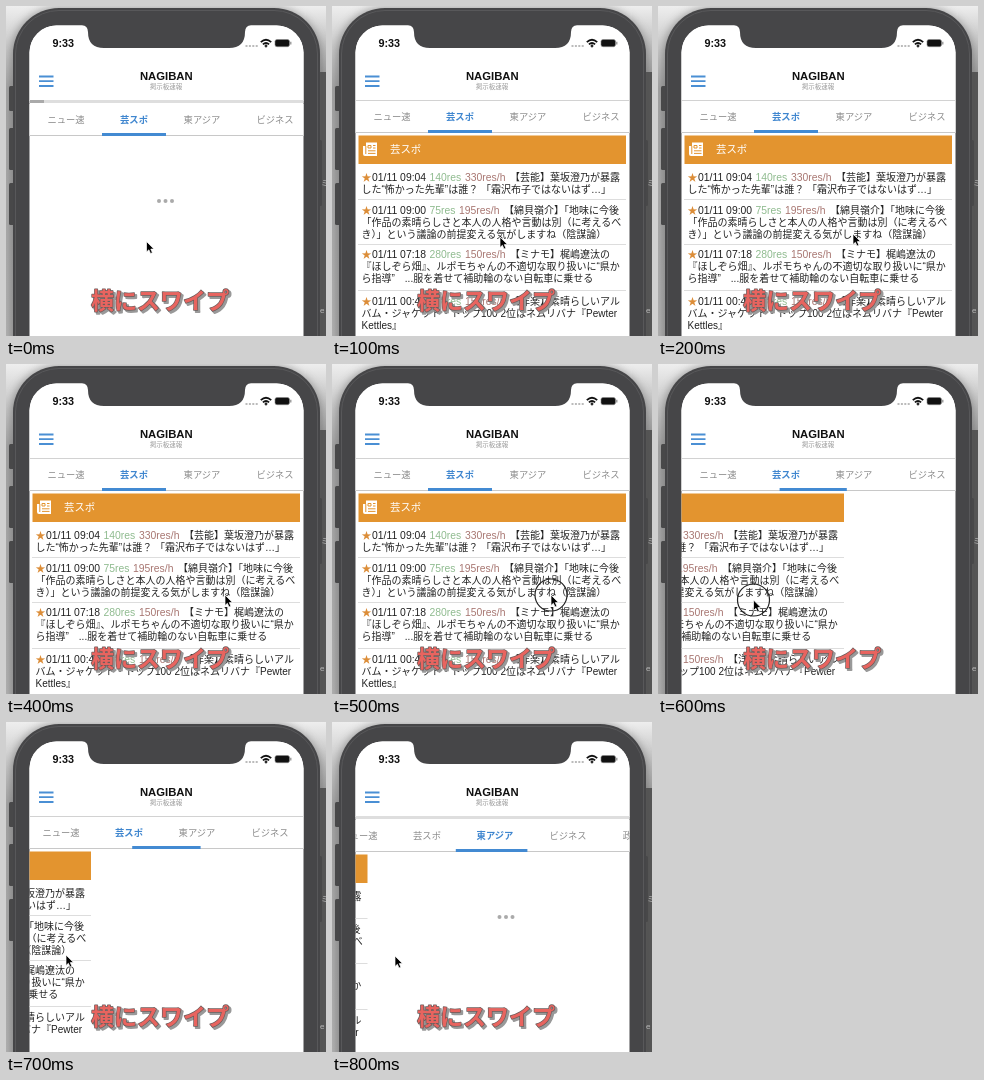
An HTML page that plays this animation: 320 by 330 pixels, repeating every 0.9 s.

```html
<!DOCTYPE html>
<html lang="ja">
<head>
<meta charset="utf-8">
<style>
html, body { margin: 0; width: 100%; height: 100%; overflow: hidden; background: #999; }
svg { display: block; width: 320px; height: 330px; }
text { font-family: "Liberation Sans", "Noto Sans CJK JP", "Noto Sans CJK", sans-serif; white-space: pre; }
.mid { text-anchor: middle; }
.tab { font-size: 9.3px; fill: #8c8c8c; }
.tab.on { fill: #3f86cf; font-weight: bold; }
.row { font-size: 10px; fill: #222; }
.row .latin { font-size: 10.4px; }
.caption { font-size: 23px; font-weight: bold; stroke-linejoin: round; paint-order: stroke; }
</style>
</head>
<body>
<svg viewBox="0 0 320 330">
  <defs>
    <linearGradient id="wall" x2="0" y2="1">
      <stop stop-color="#eee"/><stop offset=".25" stop-color="#a5a5a5"/><stop offset="1" stop-color="#b4b4b4"/>
    </linearGradient>
    <linearGradient id="side" x2="0" y2="1">
      <stop stop-color="#eee"/><stop offset=".2" stop-color="#a0a0a0"/><stop offset=".2" stop-color="#555"/>
    </linearGradient>
    <filter id="soft" x="-10%" y="-10%" width="120%" height="120%"><feGaussianBlur stdDeviation="4"/></filter>
    <clipPath id="screen"><rect x="23.5" y="19.5" width="274" height="340" rx="27"/></clipPath>
  </defs>

  <rect width="320" height="330" fill="url(#wall)"/>
  <rect x="300" width="20" height="330" fill="url(#side)"/>
  <rect x="5" y="1" width="310" height="400" rx="48" fill="#555" opacity=".5" filter="url(#soft)"/>
  <g fill="#484849">
    <rect x="3" y="80" width="6" height="25" rx="1.5"/>
    <rect x="3" y="122" width="6" height="42" rx="1.5"/>
    <rect x="3" y="177" width="6" height="42" rx="1.5"/>
    <rect x="311" y="134" width="5" height="66" rx="1.5"/>
  </g>
  <rect x="7" y="2" width="307" height="400" rx="46" fill="#464648"/>
  <rect x="9.5" y="4.5" width="302" height="400" rx="43.5" fill="none" stroke="#58585a"/>
  <g font-size="8" fill="#bbb"><text x="315" y="180">ミ</text><text x="314" y="307">e</text></g>

  <g clip-path="url(#screen)">
    <rect x="23" y="18" width="275" height="320" fill="#fff"/>
    <g id="list"></g>
    <g id="dots" fill="#aaa"><circle cx="-6.5" cy="195" r="2"/><circle cy="195" r="2"/><circle cx="6.5" cy="195" r="2"/></g>

    <rect x="23" y="18" width="275" height="77" fill="#fff"/>
    <path d="M23 94.5H298" stroke="#d2d2d2"/>
    <g id="loading"><rect x="23" y="94" width="275" height="3" fill="#dedede"/><rect id="progress" x="24" y="94" width="14" height="3" fill="#aaa"/></g>
    <g id="bar">
      <rect x="23" y="95" width="275" height="32" fill="#fff"/>
      <path d="M23 126.5H298" stroke="#c8c8c8"/>
      <g id="tabs"></g>
      <rect id="indicator" y="124" height="3" fill="#438ad2"/>
    </g>
    <path d="M33 70.5H47.5M33 75.2H47.5M33 80H47.5" stroke="#4a8fd4" stroke-width="1.8"/>
    <text class="mid" x="160.3" y="74" font-size="11.3" font-weight="bold" fill="#111">NAGIBAN</text>
    <text class="mid" x="160" y="82.5" font-size="6.5" fill="#999">掲示板速報</text>

    <text x="46.5" y="41" font-size="10.8" font-weight="bold" fill="#111">9:33</text>
    <path d="M239.5 40H252" stroke="#bbb" stroke-width="2" stroke-dasharray="2 1.4"/>
    <g fill="none" stroke="#111" stroke-width="1.8">
      <path d="M254.8 36.2Q260 31.4 265.2 36.2M256.9 38.4Q260 35.6 263.1 38.4"/>
      <circle cx="260" cy="40" r=".5"/>
    </g>
    <rect x="269" y="33.5" width="14.5" height="7.2" rx="2" fill="#111" stroke="#888" stroke-width=".6"/>
    <path d="M284.8 35.8V38.4" stroke="#888" stroke-width="1.2"/>
  </g>
  <path d="M76 19Q82 20 82 26Q82 42 98 42H223Q239 42 239 26Q239 20 245 19Z" fill="#464648"/>

  <g id="caption" class="mid"></g>
  <g id="pointer">
    <circle id="press" r="16" fill="none" stroke="#222" stroke-width="1.2"/>
    <path d="M0 0V10.5L2.4 8.3L4 12L5.9 11.2L4.3 7.6H7.5Z" fill="#000" stroke="#fff" stroke-width=".7"/>
  </g>
</svg>
<script>
const $ = id => document.getElementById(id);

const ROWS = [
  { y: 175, time: '09:04', res: 140, rate: 330, lines: ['【芸能】葉坂澄乃が暴露', 'した“怖かった先輩”は誰？ 「霜沢布子ではないはず…」'] },
  { y: 208, time: '09:00', res: 75, rate: 195, lines: ['【綿貝嶺介】「地味に今後', '「作品の素晴らしさと本人の人格や言動は別（に考えるべ', 'き）」という議論の前提変える気がしますね（陰謀論）'] },
  { y: 252, time: '07:18', res: 280, rate: 150, lines: ['【ミナモ】梶嶋遼汰の', '『ほしぞら畑』、ルポモちゃんの不適切な取り扱いに“県か', 'ら指導”　...服を着せて補助輪のない自転車に乗せる'] },
  { y: 299, time: '00:48', res: 280, rate: 150, lines: ['【洋楽】素晴らしいアル', 'バム・ジャケット・トップ100 2位はネムリバナ『Pewter', 'Kettles』'] },
];

function rowMarkup({ y, time, res, rate, lines }) {
  const shift = res < 100 ? -6 : 0;
  const latin = (x, fill, text) => `<text class="latin" x="${x}" y="${y}" fill="${fill}">${text}</text>`;
  const [first, ...rest] = lines;
  return `<g class="row"><text x="29.5" y="${y}" fill="#dc8d38">★</text>`
    + latin(40, '#222', '01/11 ' + time)
    + latin(97.5, '#8fbb8f', res + 'res')
    + latin(133 + shift, '#a87772', rate + 'res/h')
    + `<text x="${178 + shift}" y="${y}">${first}</text>`
    + rest.map((line, i) => `<text x="29.5" y="${y + 12 * (i + 1)}">${line}</text>`).join('')
    + '</g>';
}

$('list').innerHTML = `
  <rect x="26.5" y="129.5" width="267.5" height="28.5" fill="#e3942f"/>
  <path d="M34 136.5H45V150H33Q31 150 31 148V140H34Z" fill="#fff"/>
  <path d="M33.8 140V148M36 139.5H39V142H36ZM41 139.5H43.5M41 142H43.5M36 144.8H43.5M36 147.4H43.5" stroke="#e3942f" fill="none"/>
  <text x="58" y="146.5" font-size="10.4" fill="#fff">芸スポ</text>
  <path d="M26 193.5H294M26 238.5H294M26 284.5H294" stroke="#ddd"/>` + ROWS.map(rowMarkup).join('');

$('tabs').innerHTML = [['ニュー速', 60], ['芸スポ', 128], ['東アジア', 196], ['ビジネス', 269], ['政治', 333]]
  .map(([name, x]) => `<text class="tab mid" x="${x}" y="114">${name}</text>`).join('');

$('caption').innerHTML = [[156, 305, '#999', '#999', 2], [154, 303, '#e8645f', '#6b5d5c', 1.4]]
  .map(([x, y, fill, stroke, w]) => `<text class="caption" x="${x}" y="${y}" fill="${fill}" stroke="${stroke}" stroke-width="${w}">横にスワイプ</text>`).join('');

// One pose per 100 ms: pointer, page swipe, tab scroll, indicator progress.
const STEP = 100;
const POSES = [
  { at: [140.5, 235.5], swipe: 0, scroll: 0, mark: 0, loading: true },
  { at: [168, 231], swipe: 0, scroll: 0, mark: 0 },
  { at: [195, 228], swipe: 0, scroll: 0, mark: 0 },
  { at: [212, 229], swipe: 0, scroll: 0, mark: 0 },
  { at: [219, 231], swipe: 0, scroll: 0, mark: 0 },
  { at: [219, 231], swipe: 0, scroll: 0, mark: 0, press: true },
  { at: [95.5, 236], swipe: 108, scroll: 0, mark: 0.4, press: true },
  { at: [60, 233], swipe: 209, scroll: 5, mark: 0.55 },
  { at: [63, 234], swipe: 258.5, scroll: 33, mark: 0.95, loading: true },
];
const show = (id, on) => $(id).setAttribute('visibility', on ? 'visible' : 'hidden');
const move = (id, x, y) => $(id).setAttribute('transform', `translate(${x} ${y})`);

function draw(time) {
  const { at, swipe, scroll, mark, loading = false, press = false } = POSES[Math.floor(time / STEP) % POSES.length];
  const drop = loading ? 3 : 0;
  const firstLoad = loading && swipe === 0;
  show('list', !firstLoad);
  move('list', -swipe, drop);
  show('dots', loading);
  move('dots', firstLoad ? 159.5 : 432.5 - swipe, 0);
  show('loading', loading);
  $('progress').setAttribute('width', firstLoad ? 14 : 0);
  move('bar', 0, drop);
  move('tabs', -scroll, 0);
  $('indicator').setAttribute('x', 96 + 64 * mark - scroll);
  $('indicator').setAttribute('width', 64 + 8 * mark);
  const selected = mark > 0.9 ? 2 : 1;
  [...$('tabs').children].forEach((tab, i) => tab.classList.toggle('on', i === selected));
  move('pointer', ...at);
  show('press', press);
}

const start = performance.now();
function tick() {
  draw(performance.now() - start);
  requestAnimationFrame(tick);
}
tick();
</script>
</body>
</html>
```
